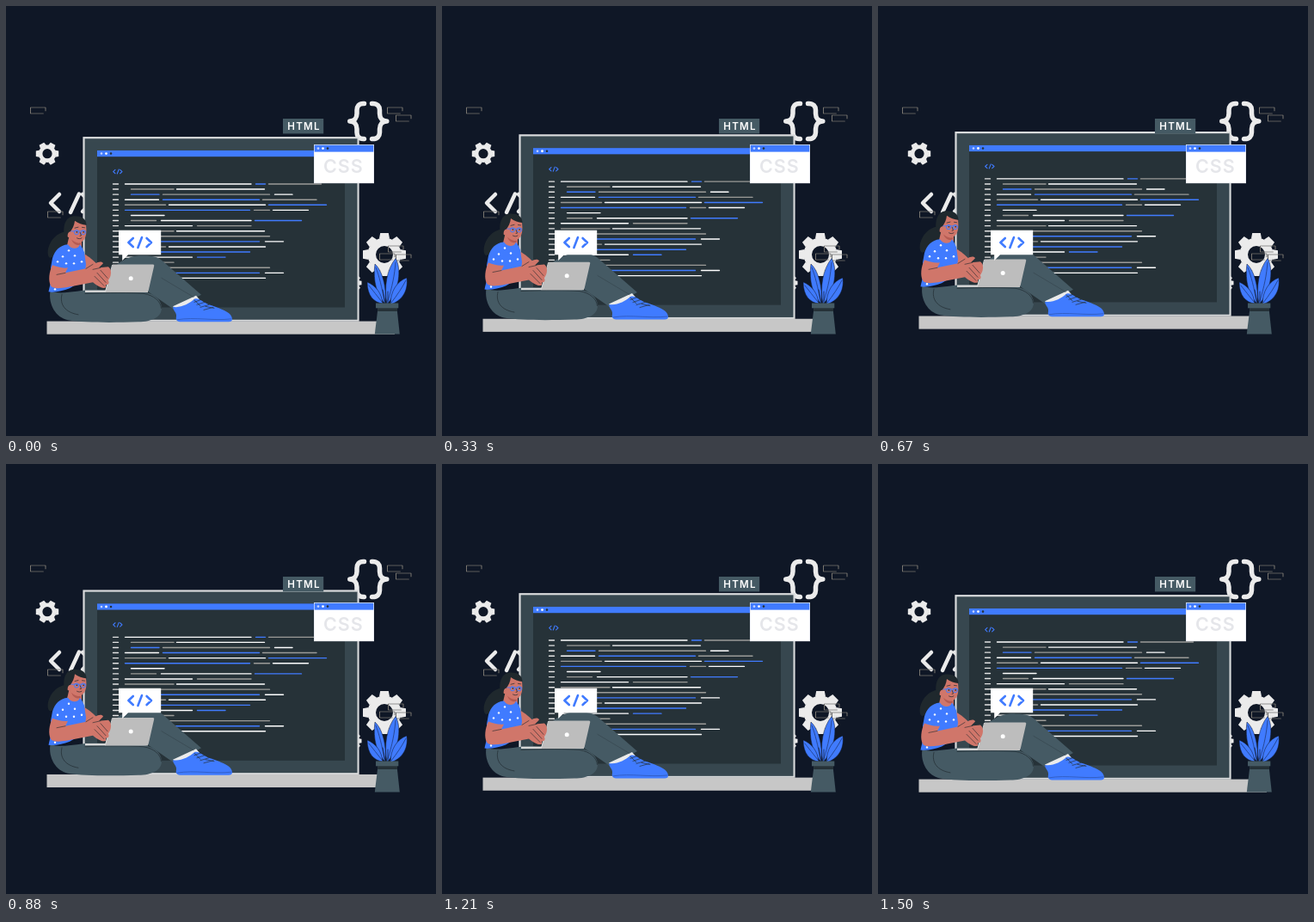
Recreate the animation shown at these times as an HTML page with a canvas. Size 500 by 500 pixels, loop 1.54 s.

```html
<!DOCTYPE html>
<html lang="en">
<head>
<meta charset="utf-8">
<title>Coding at the screen</title>
<style>
html, body { margin: 0; width: 100%; height: 100%; overflow: hidden; background: #0f1726; }
canvas { display: block; width: 100vw; height: 100vh; }
</style>
</head>
<body>
<canvas id="stage" width="500" height="500"></canvas>
<script>
const ctx = document.getElementById('stage').getContext('2d');
const LOOP = 1540, HIGHEST_TIME = 735, RISE = 6.2, REST = 0.4;

const C = {
  bg: '#0f1726', blue: '#407bff', slate: '#455a64', bezel: '#37474f', dark: '#263238',
  white: '#ffffff', pale: '#ebebeb', grey: '#9b9b98', metal: '#c7c7c7', skin: '#d0766a',
  skinDark: '#b55b52', hair: '#1f282d'
};

function fill(d, color) {
  ctx.fillStyle = color;
  ctx.fill(new Path2D(d));
}

function line(d, color, width = 1, cap = 'round') {
  ctx.strokeStyle = color;
  ctx.lineWidth = width;
  ctx.lineCap = cap;
  ctx.lineJoin = 'round';
  ctx.stroke(new Path2D(d));
}

function rect(x, y, right, bottom, color) {
  ctx.fillStyle = color;
  ctx.fillRect(x, y, right - x, bottom - y);
}

function dot(x, y, r, color) {
  ctx.fillStyle = color;
  ctx.beginPath();
  ctx.arc(x, y, r, 0, Math.PI * 2);
  ctx.fill();
}

function label(text, x, y, size, color, spacing) {
  ctx.font = `600 ${size}px Inter, "Open Sans", sans-serif`;
  ctx.letterSpacing = spacing + 'px';
  ctx.fillStyle = color;
  ctx.fillText(text, x, y);
}

function gear(x, y, outer, root, hole, teeth, half) {
  ctx.save();
  ctx.translate(x, y);
  ctx.strokeStyle = ctx.fillStyle = C.pale;
  ctx.lineWidth = root - hole;
  ctx.beginPath();
  ctx.arc(0, 0, (root + hole) / 2, 0, Math.PI * 2);
  ctx.stroke();
  for (let i = 0; i < teeth; i++) {
    ctx.beginPath();
    ctx.moveTo(root - 1, -half * 1.25);
    ctx.lineTo(outer, -half);
    ctx.lineTo(outer, half);
    ctx.lineTo(root - 1, half * 1.25);
    ctx.fill();
    ctx.rotate(Math.PI * 2 / teeth);
  }
  ctx.restore();
}

function smallBoxes() {
  ctx.save();
  ctx.globalCompositeOperation = 'difference';
  for (const [x, y] of [[28, 118], [48, 239], [443, 118], [453, 127], [434, 288], [444, 279], [453, 289]])
    line(`M${x + 18} ${y + 4}v-4h-17.5v7h15`, '#b4b4b4', 0.7);
  ctx.restore();
}

function windowDots(x, y) {
  dot(x, y, 1.3, '#c5d5ff');
  dot(x + 5.5, y, 1.4, C.white);
  dot(x + 11, y, 1.3, C.dark);
}

function backdrop() {
  rect(0, 0, 500, 500, C.bg);
  gear(48, 171.7, 13.2, 10.2, 5.6, 6, 3.2);
  gear(440, 289, 25, 19.4, 10, 8, 4.8);
  gear(403, 322, 10.5, 8, 4, 8, 2.2);
  line('M62 219L52 229L62 239 M85 218.5L75 240 M89 219L99 229L89 239', C.pale, 4.5);
  line('M416.5 113.5C410 113 408 117 408 121V125C408 130 405 134 399.8 134C405 134 408 138 408 143V147C408 151 410 155 416.5 154.5', C.pale, 5.5);
  line('M425.5 113.5C432 113 434.5 117 434.5 121V125C434.5 130 437.5 134 442.8 134C437.5 134 434.5 138 434.5 143V147C434.5 151 432 155 425.5 154.5', C.pale, 5.5);
  smallBoxes();
}

// Segments per row: start, end, color key.
const codeRows = [
  [[138, 285.5, 'white'], [290, 302, 'blue'], [305, 367, 'grey']],
  [[145, 195.5, 'grey'], [198, 301, 'white']],
  [[145, 178.5, 'blue'], [182, 307, 'grey'], [312, 333.5, 'white']],
  [[138, 178, 'white'], [182, 295, 'blue'], [298, 361.5, 'grey']],
  [[138, 186, 'grey'], [189, 302, 'white'], [305, 373, 'blue']],
  [[138, 284, 'blue'], [288, 307, 'grey'], [310, 352, 'white']],
  [[145, 184.5, 'white']],
  [[145, 175, 'grey'], [180, 285.5, 'white'], [289, 344, 'blue']],
  [[138, 217, 'white'], [222, 285.5, 'grey']],
  [[138, 195.5, 'grey'], [198, 301, 'white']],
  [[138, 307, 'grey']],
  [[138, 295, 'blue'], [301, 323, 'white']],
  [[138, 186, 'grey'], [189, 302, 'white']],
  [[138, 284, 'blue']],
  [[138, 217, 'white'], [222, 255.5, 'blue']],
  [[145, 195.5, 'grey']],
  [[145, 307, 'grey']],
  [[138, 295, 'blue'], [301, 323, 'white']],
  [[138, 302, 'white']]
];

function monitor() {
  rect(89.4, 151.7, 410.6, 366.4, '#d9dbdc');
  rect(91.6, 153.9, 408.5, 364.4, C.bezel);
  rect(106, 167.6, 394, 350.1, C.dark);
  rect(106, 167.6, 394, 174.8, C.blue);
  windowDots(111, 171.2);
  line('M127 190l-2.3 2.2l2.3 2.2 M131.2 189.6l-1.9 5 M132.7 190l2.3 2.2l-2.3 2.2', C.blue, 1.1);
  codeRows.forEach((row, i) => {
    const y = 206.6 + i * 6.08;
    line(`M124.5 ${y}H130.5`, '#e4e4e4', 1.4);
    for (const [from, to, key] of row) line(`M${from + 0.5} ${y}H${to - 0.5}`, C[key], 1.4);
  });
}

function legs() {
  fill('M116 316C126 300 140 289 160 290C172 290 178 292 184 298L227 335.5L195 352.5L164 331L120 338Z', C.slate);
  fill('M194 349L221 336.5L225 341L200 355Z', C.pale);
  fill('M194.5 349.5C203 351 213 346 219 340.5C222 339 226 341 230 344C240 350 263 353 263 364Q263 367 259 367H204C199 367 197 365 198 361C199 356 193 353 194.5 349.5Z', C.blue);
  line('M199 364.4C220 361 240 366 262 363.5', '#2b52ad', 0.7);
  line('M219 341.5l7 7M222 347l9-3M226 350l10-3M230 353l11-3M219 344l8-3M232 349l10 2', C.dark, 0.7);
  fill('M51.5 331C66 337 88 328 110 330L158 332C171 333 181 341 181 351C181 361 170 367 154 367C122 368 92 368 72 365C58 362 49 347 51.5 331Z', C.slate);
  line('M65 335C62 347 69 356 84 358.5M92 334C120 333 145 333 160 334C172 336 180 343 180.5 351', C.dark, 0.8);
  line('M181 316L218 338', C.bezel, 0.7);
}

function head() {
  fill('M69 262C59 264 52 271 49 282C48 288 49 292 51.5 292.5C58 291 64 287 68 280C74 281 77 275 77 267Z', C.hair);
  fill('M74 265L88 270L88 280C84 285 74 284 71 278Z', C.skin);
  fill('M76 271C80 275 84 276 87 275L87 277C83 279 78 277 76 271Z', C.skinDark);
  fill('M73 252C78 247 91 248 93 255C94 262 93.5 271 88 274C81 276 75 271 72 266Z', C.skin);
  dot(73, 266, 2.6, C.skin);
  fill('M68 267C65.5 254 70 244 80 244C88 244 93.5 247 93.5 254.5C89 254 84 252.5 80 249.5C79.5 255 77 259 75 262C72 262 71 266 72 270Z', C.hair);
  line('M76 261.5H92', C.blue, 0.9);
  ctx.strokeStyle = C.blue;
  ctx.lineWidth = 1;
  for (const x of [82, 89.8]) {
    ctx.beginPath();
    ctx.arc(x, 262.8, 2.6, 0, Math.PI * 2);
    ctx.stroke();
    dot(x + 0.4, 262.5, 0.8, C.hair);
  }
  line('M80 257.8l4-1M88.5 257l3 .4M86.2 263l1.3 3.6-1.4.3M82.5 269.5c2 1.2 4 1 5.5 0', C.hair, 0.7);
}

const shirtDots = [[73, 284], [66, 291], [80, 290], [88, 297], [79, 299], [70, 299], [60, 297], [57, 329]];

function torso() {
  fill('M88 287C94 289 100 294 106 300L102 311L88 305Z', C.skin);
  fill('M72 277C62 278 57 284 54 293L52 304C55 314 51 324 49.5 332C57 333 66 331 74 328L91 318L93 300L91 286C89 281 87 278 86 277C84 283 76 283 72 277Z', C.blue);
  for (const [x, y] of shirtDots) dot(x, y, 1.2, C.white);
}

function laptop() {
  rect(92, 330.2, 165, 332.6, '#d6d6d6');
  fill('M124 300.2H171Q172.7 300.2 172.2 302L165.7 330.5Q165.2 332.6 163 332.6H115Z', '#bdbdbd');
  line('M123.5 301L115.5 332', '#dedede', 0.9);
  dot(145.2, 316.3, 2.5, C.white);
}

function frontArm() {
  fill('M54 301C50 309 49 319 52 325C55 329 63 328 70 327L101 321C106 325 112 329 116 327L116 324C120 324 120 321 119 319L121 315C123 310 122 305 119 303L108 304L113 299C112 296 107 297 104 299L93 305L69 310L72 304C66 305 60 303 54 301Z', C.skin);
  line('M69 310L59 312M101 306l9-2M110 307l8 9M106 310l10 11M103 314l11 11M93 305l8-5', C.hair, 0.6);
}

function plant() {
  const leaves = [
    ['M441 346C432 338 426 320 429 300C437 307 443 326 441 346Z', 'M440 343C437 327 434 314 430 304'],
    ['M438 346C428 345 420 337 420 321C430 325 437 334 438 346Z', 'M437 344C432 338 427 331 422 325'],
    ['M443 347C439 326 443 306 453 293.5C460 305 458 330 443 347Z', 'M444 343C449 327 452 312 453 298'],
    ['M447 347C447 331 455 320 466 316C468 332 460 343 447 347Z', 'M448 345C455 336 461 327 465 319']
  ];
  for (const [shape, vein] of leaves) {
    fill(shape, C.blue);
    line(shape, C.bg, 0.5);
    line(vein, '#203b7b', 0.8);
  }
  line('M441 346L438 330M444 346V332', C.bg, 0.7);
  fill('M432.5 351H454.5L457.8 381.6H428.8Z', C.slate);
  rect(432.2, 351, 455, 355, C.dark);
  rect(430, 345.5, 456.3, 351.3, C.slate);
}

function overlays() {
  fill('M131 260.8H180.2V289.3H142L135.2 296V289.3H131Z', C.white);
  line('M147.8 270L142.4 275L147.8 280M158 269L153.4 281M163.6 270L169 275L163.6 280', C.blue, 2.6);
  rect(358, 161, 428, 206.2, '#e3e6ee');
  rect(358.7, 161.7, 427.3, 205.5, C.white);
  rect(358.7, 161.7, 427.3, 169.6, C.blue);
  windowDots(363, 165.6);
  label('CSS', 369, 194.4, 21.5, '#e5e6ea', 1);
  rect(322, 131, 369.2, 148.4, C.slate);
  label('HTML', 327.3, 144, 11.6, C.white, 1.2);
}

function draw(now) {
  const phase = (now % LOOP - HIGHEST_TIME) / LOOP * Math.PI * 2;
  const shift = REST - RISE * (1 + Math.cos(phase)) / 2;
  backdrop();
  ctx.save();
  ctx.translate(0, shift);
  monitor();
  rect(47.5, 366.2, 452, 381.3, C.metal);
  legs();
  head();
  torso();
  laptop();
  frontArm();
  ctx.restore();
  plant();
  overlays();
}

const start = performance.now();
function tick() {
  draw(performance.now() - start);
  requestAnimationFrame(tick);
}
tick();
</script>
</body>
</html>
```
